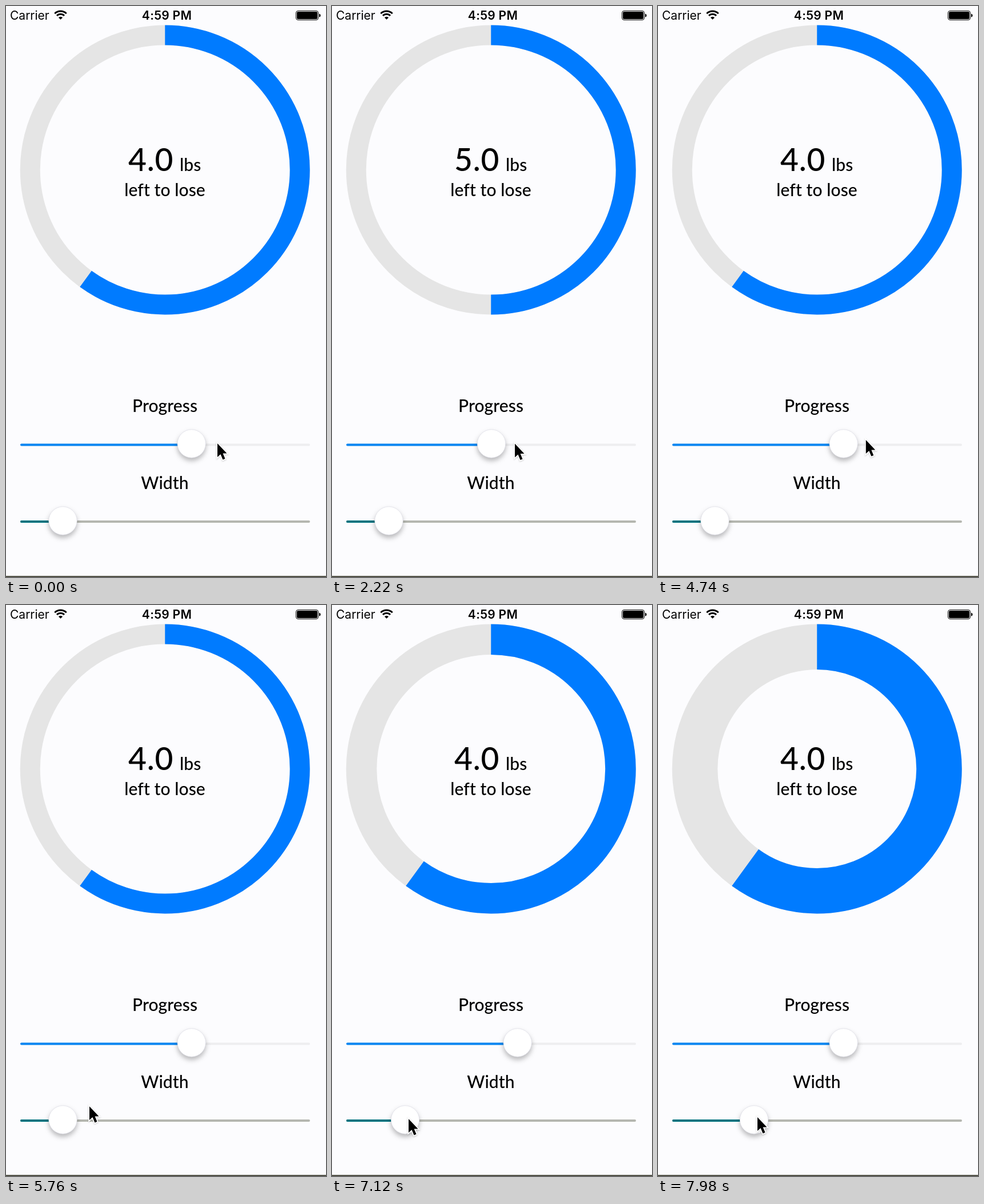
Animation of 560 by 1000 pixels, one loop 8000 ms. Source, as an HTML page:

```html
<!DOCTYPE html>
<html lang="en">
<head>
<meta charset="utf-8">
<title>Progress ring</title>
<style>
  html, body { margin: 0; width: 100%; height: 100%; overflow: hidden; background: #fcfcfe; }
  svg { display: block; width: 560px; height: 1000px; }
  .label { font: 500 30px Lato, sans-serif; letter-spacing: .1px; }
  .value { font-size: 55px; letter-spacing: .8px; }
  .status { font: 400 21px Inter, sans-serif; }
  .clock { font-weight: 600; letter-spacing: .3px; }
  .middle { text-anchor: middle; }
  .ring, .wave { fill: none; }
  .wave { stroke: #000; stroke-width: 3; }
  .track { stroke-width: 4; stroke-linecap: round; }
  .thumb { fill: #fff; stroke: #dcdce6; stroke-width: .7; filter: drop-shadow(0 5px 4px #0004); }
  #cursor { stroke: #fff; stroke-width: 3.5; paint-order: stroke; filter: drop-shadow(0 1px 1px #0003); }
</style>
</head>
<body>
<svg viewBox="0 0 560 1000">
  <text class="status" x="7" y="24">Carrier</text>
  <path class="wave" d="M85.3 13.3a14.5 14.5 0 0 1 20.4 0M89 17a9.2 9.2 0 0 1 13 0"/>
  <path d="M95.5 23.8l-3.6-3.6a5 5 0 0 1 7.2 0z"/>
  <text class="status clock middle" x="281.5" y="24">4:59 PM</text>
  <rect x="507.5" y="8.5" width="39" height="16" rx="3.5" fill="none" stroke="#000"/>
  <rect x="509" y="10" width="36" height="13" rx="2"/>
  <path d="M548 13.5q2.5 .5 2.5 3t-2.5 3z"/>

  <g transform="rotate(-90 278.25 287)">
    <circle class="ring" cx="278.25" cy="287" stroke="#e5e5e5"/>
    <circle class="ring" id="arc" cx="278.25" cy="287" stroke="#007bff" pathLength="100"/>
  </g>
  <text class="label value" id="value" x="214" y="289"></text>
  <text class="label" x="304" y="289">lbs</text>
  <text class="label middle" x="278" y="333">left to lose</text>

  <text class="label middle" x="278" y="711">Progress</text>
  <g id="progress">
    <path class="track" d="M27 768.5H530" stroke="#eeeef0"/>
    <path class="track fill" stroke="#0585f2"/>
    <circle class="thumb" cy="766.5" r="24.7"/>
  </g>
  <text class="label middle" x="278" y="846">Width</text>
  <g id="width">
    <path class="track" d="M27 903H530" stroke="#b5b7b0"/>
    <path class="track fill" stroke="#00737f"/>
    <circle class="thumb" cy="901.5" r="24.7"/>
  </g>
  <rect y="998" width="560" height="2" fill="#55554a"/>
  <path id="cursor" d="M0 0V24L5.5 19 9.5 28.5 13.5 26.8 9.6 17.5H16.5Z"/>
</svg>
<script>
const LOOP = 8000, RADIUS = 253.5, GRAB = 6520;
const $ = selector => document.querySelector(selector);
const rings = document.querySelectorAll('.ring');

// time, x, y
const cursorPath = [
  [0, 370, 766], [1380, 320, 768], [3200, 320, 765], [4740, 364, 760],
  [5760, 146, 878], [GRAB, 105.5, 901], [7120, 134, 900], [7980, 174, 897], [LOOP, 175, 897]
];

function cursorAt(t) {
  const i = cursorPath.findIndex(key => key[0] > t);
  const [t0, x0, y0] = cursorPath[i - 1], [t1, x1, y1] = cursorPath[i];
  const k = (t - t0) / (t1 - t0);
  return [x0 + (x1 - x0) * k, y0 + (y1 - y0) * k];
}

function setSlider(id, x, y) {
  $(`#${id} .fill`).setAttribute('d', `M27 ${y}H${x}`);
  $(`#${id} .thumb`).setAttribute('cx', x);
}

function draw(t) {
  const [x, y] = cursorAt(t);
  const progress = t >= 690 && t < 3970 ? .5 : .6; // the slider snaps to tenths
  const widthThumb = t < GRAB ? 99.5 : x - 6;
  const stroke = 35 + (widthThumb - 99.5) * .65;

  for (const ring of rings) {
    ring.setAttribute('r', RADIUS - stroke / 2);
    ring.setAttribute('stroke-width', stroke);
  }
  $('#arc').setAttribute('stroke-dasharray', `${progress * 100} 100`);
  $('#value').textContent = (10 * (1 - progress)).toFixed(1);
  setSlider('progress', 50.5 + 457 * progress, 768.5);
  setSlider('width', widthThumb, 903);
  $('#cursor').setAttribute('transform', `translate(${x} ${y})`);
}

const start = performance.now();
function tick() {
  draw((performance.now() - start) % LOOP);
  requestAnimationFrame(tick);
}
tick();
</script>
</body>
</html>
```
